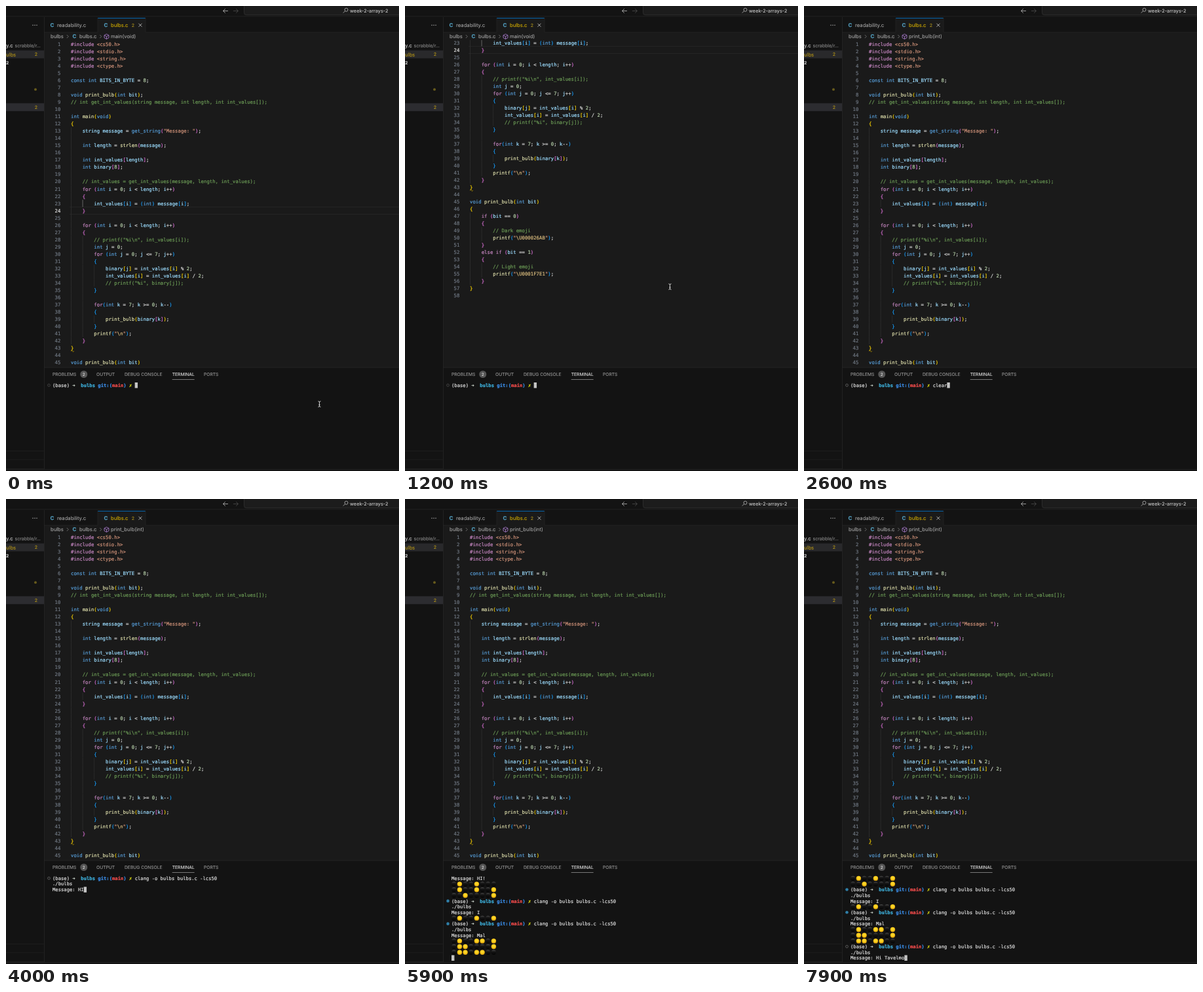
An HTML page for the animation above (8 s loop, 600x709 px).

```html
<!DOCTYPE html>
<html lang="en">
<head>
<meta charset="utf-8">
<title>Binary bulbs</title>
<style>
  html, body { margin: 0; width: 100%; height: 100%; overflow: hidden; background: #131313; }
  svg { display: block; width: 600px; height: 709px; }
  text { text-rendering: geometricPrecision; white-space: pre; fill: currentColor; stroke: currentColor; }
  .ui { font-family: Inter, "Open Sans", sans-serif; stroke-width: 0.12px; }
  .mono { font-family: "DejaVu Sans Mono", "Noto Sans Mono", monospace; stroke-width: 0.2px; }
</style>
</head>
<body>
<svg id="stage" viewBox="0 0 600 709">
  <defs>
    <clipPath id="editorClip"><rect x="58" y="52" width="542" height="498.5"/></clipPath>
    <radialGradient id="lit" cy=".4"><stop offset="0" stop-color="#ffdc32"/><stop offset=".7" stop-color="#fbcb1c"/><stop offset="1" stop-color="#dfa50c"/></radialGradient>
    <linearGradient id="dark" x2="0" y2="1"><stop offset="0" stop-color="#4a4a4a"/><stop offset=".35" stop-color="#161616"/><stop offset="1" stop-color="#040404"/></linearGradient>
  </defs>
</svg>
<script>
const LOOP = 8000, STEP = 100;
const CODE = { x: 99, y: 58.5, pitch: 11.02, size: 7.34, advance: 4.42 };
const TERM = { x: 71, y: 578.2, pitch: 8.68, size: 7.2, advance: 4.334, rows: 15 };

const source = String.raw`#include <cs50.h>
#include <stdio.h>
#include <string.h>
#include <ctype.h>

const int BITS_IN_BYTE = 8;

void print_bulb(int bit);
// int get_int_values(string message, int length, int int_values[]);

int main(void)
{
    string message = get_string("Message: ");

    int length = strlen(message);

    int int_values[length];
    int binary[8];

    // int_values = get_int_values(message, length, int_values);
    for (int i = 0; i < length; i++)
    {
        int_values[i] = (int) message[i];
    }

    for (int i = 0; i < length; i++)
    {
        // printf("%i\n", int_values[i]);
        int j = 0;
        for (int j = 0; j <= 7; j++)
        {
            binary[j] = int_values[i] % 2;
            int_values[i] = int_values[i] / 2;
            // printf("%i", binary[j]);
        }

        for(int k = 7; k >= 0; k--)
        {
            print_bulb(binary[k]);
        }
        printf("\n");
    }
}

void print_bulb(int bit)
{
    if (bit == 0)
    {
        // Dark emoji
        printf("\U000026AB");
    }
    else if (bit == 1)
    {
        // Light emoji
        printf("\U0001F7E1");
    }
}
`.split('\n');

const stage = document.getElementById('stage');

function add(parent, name, attrs, text) {
  const node = document.createElementNS('http://www.w3.org/2000/svg', name);
  for (const key in attrs) node.setAttribute(key, attrs[key]);
  if (text !== undefined) node.textContent = text;
  parent.append(node);
  return node;
}
const rect = (parent, x, y, width, height, fill, more) =>
  add(parent, 'rect', { x, y, width, height, fill, ...more });
const stroke = (parent, d, color, width = 0.8) =>
  add(parent, 'path', { d, stroke: color, 'stroke-width': width, fill: 'none' });
const label = (x, y, text, color, size = 7.7, more) =>
  add(stage, 'text', { class: 'ui', x, y: y + size * 0.36, color, 'font-size': size, ...more }, text);
const mono = (parent, font, x, y, text, color, more) =>
  add(parent, 'text', { class: 'mono', x, y: y + 2.6, color, 'font-size': font.size, ...more }, text);

// Window frame
function drawFrame() {
  const edge = '#292929', bold = { 'font-weight': 700 };
  rect(stage, 0, 0, 600, 709, '#131313');
  rect(stage, 58, 40, 542, 511, '#1a1a1a');
  rect(stage, 140, 18, 73, 23, '#1a1a1a');
  rect(stage, 140, 18, 73, 0.8, '#0078d4');
  rect(stage, 0, 15.5, 600, 0.7, edge);
  rect(stage, 58, 17, 0.7, 689, edge);
  rect(stage, 139.7, 18, 0.6, 22, edge);
  rect(stage, 212.7, 18, 0.6, 22, edge);
  rect(stage, 58, 39.7, 82, 0.6, edge);
  rect(stage, 213, 39.7, 387, 0.6, edge);
  rect(stage, 58, 550.8, 542, 0.7, edge);
  rect(stage, 0, 706, 600, 0.7, edge);
  for (const y of [678, 691.5, 705]) rect(stage, 0, y, 58, 0.6, '#222');

  rect(stage, 363.5, -4, 260, 17.7, '#1c1c1c', { rx: 3.5, stroke: '#363636', 'stroke-width': 0.7 });
  stroke(stage, 'M339 7.5H331.5M334.8 4.2L331.5 7.5L334.8 10.8', '#bbb');
  stroke(stage, 'M347 7.5H354.5M351.2 4.2L354.5 7.5L351.2 10.8', '#4c4c4c');
  stroke(stage, 'M517.6 7.6L514.8 10.6M522 5.8a2.5 2.5 0 1 1-5 0a2.5 2.5 0 1 1 5 0', '#bbb');
  label(525, 7.3, 'week-2-arrays-2', '#c4c4c4', 7.34);

  for (const x of [41, 44, 47]) add(stage, 'circle', { cx: x, cy: 29.2, r: 0.7, fill: '#bbb' });
  label(0, 60.5, 'y.c', '#ccc');
  label(13.5, 60.5, 'scrabble/r...', '#888', 7);
  rect(stage, 0, 67.7, 58, 12, '#29292b');
  label(0, 73.8, 'ulbs', '#b59617');
  label(43.8, 73.6, '2', '#b59617', 7);
  label(0, 87, '2', '#ccc', 6.8, bold);
  add(stage, 'circle', { cx: 45, cy: 127.2, r: 2, fill: '#665a1c' });
  rect(stage, 0, 148.3, 58, 12, '#2c2c30');
  label(43.8, 154.3, '2', '#b59617', 7);

  for (const [x, y] of [[67.5, 29], [149.5, 29], [101.5, 46.5]]) label(x, y, 'C', '#519aba', 8, bold);
  label(78, 29, 'readability.c', '#9d9d9d');
  label(160, 29, 'bulbs.c', '#cca700');
  label(191.8, 29, '2', '#a88f1e', 7);
  stroke(stage, 'M202.5 26.7L207.5 31.7M207.5 26.7L202.5 31.7', '#ccc');

  label(68, 46.5, 'bulbs', '#a0a0a0');
  label(112, 46.5, 'bulbs.c', '#a0a0a0');
  stroke(stage, 'M92.8 44L95.3 46.5L92.8 49M143.3 44L145.8 46.5L143.3 49', '#888', 0.7);
  stroke(stage, 'M153.5 42.8L157 44.6V48.5L153.5 50.4L150 48.5V44.6ZM150 44.6L153.5 46.5L157 44.6M153.5 46.5V50.4', '#b180d7', 0.8);

  const tabs = [[71, 'PROBLEMS'], [138, 'OUTPUT'], [181, 'DEBUG CONSOLE'], [253.7, 'TERMINAL'], [302, 'PORTS']];
  for (const [x, name] of tabs) label(x, 561.5, name, name === 'TERMINAL' ? '#ddd' : '#959595', 6.73);
  rect(stage, 253.7, 569, 34, 0.7, '#a4a4a4');
  add(stage, 'circle', { cx: 118.8, cy: 561.5, r: 5.5, fill: '#565656' });
  label(118.8, 561.5, '2', '#eee', 6, { 'text-anchor': 'middle' });
}

// Syntax colouring
const rules = [
  [/^\/\/.*/, '#6a9955'],
  [/^(#include|\b(for|if|else)\b)/, '#c586c0'],
  [/^(<\w+\.h>|"[^"\\]*"(?!\S*\\)|")/, '#ce9178'],
  [/^\\\w+/, '#d7ba7d'],
  [/^\b(const|int|void|get_string)\b/, '#569cd6'],
  [/^[a-z_]\w*(?=\()/i, '#dcdcaa'],
  [/^\d+/, '#b5cea8'],
  [/^[a-z_]\w*/i, '#9cdcfe'],
  [/^[()[\]{}]/, 'bracket'],
  [/^\s+/, null],
  [/^[^\s\w()[\]{}"]+/, '#d4d4d4'],
];
const bracketColors = ['#ffd700', '#da70d6', '#179fff'];

function drawCode(parent) {
  let depth = 0, indent = 0;
  return source.map((line, row) => {
    const y = CODE.y + row * CODE.pitch;
    if (line) indent = line.search(/\S/);
    for (let col = 0; col < indent; col += 4)
      rect(parent, CODE.x + col * CODE.advance + 0.1, y - 5.5, 0.6, CODE.pitch, '#363636');
    for (let col = 0; col < line.length;) {
      const rest = line.slice(col);
      let [pattern, color] = rules.find(([re]) => re.test(rest));
      const token = rest.match(pattern)[0];
      if (color === 'bracket') {
        const opens = '([{'.includes(token);
        if (!opens) depth--;
        color = bracketColors[depth % 3];
        if (opens) depth++;
      }
      if (color) mono(parent, CODE, CODE.x + col * CODE.advance, y, token, color);
      col += token.length;
    }
    return mono(parent, CODE, 83.3, y, row + 1, '#6e7681', { 'text-anchor': 'end' });
  });
}

drawFrame();
const scope = label(160, 46.5, '', '#a0a0a0');
const editor = add(stage, 'g', { 'clip-path': 'url(#editorClip)' });
const page = add(editor, 'g');
const lineMark = add(page, 'g');
rect(lineMark, 97, -5.6, 503, 0.7, '#2b2b2b');
rect(lineMark, 97, 5, 503, 0.7, '#2b2b2b');
const numbers = drawCode(page);
const activeGuide = rect(page, 116.7, CODE.y + 22 * CODE.pitch - 5.5, 0.7, CODE.pitch, '#777');
stroke(page, 'M99 526.2q1.2 -2 2.4 0t2.4 0', '#cca700', 0.8);
const terminal = add(stage, 'g');
const pointer = stroke(stage, 'M-2 -4.3Q0 -4.3 0 -3Q0 -4.3 2 -4.3M0 -3V3M-2 4.3Q0 4.3 0 3Q0 4.3 2 4.3M-1.2 1H1.2', '#ddd', 0.9);

// Terminal session
const command = 'clang -o bulbs bulbs.c -lcs50';
const greeting = 'Hi Tavelmor';
const cut = (time, length) => [time, greeting.slice(0, length)];
const runs = [
  { prompt: 0, command: 3100, ask: 3500, keys: [[4000, 'HI'], [4100, 'HI!']], output: 4400 },
  { prompt: 4500, command: 4700, ask: 4900, keys: [[5100, 'I']], output: 5300 },
  { prompt: 5400, command: 5500, ask: 5700, keys: [[5800, 'Mal']], output: 5900 },
  { prompt: 6000, command: 6300, ask: 6700, output: Infinity,
    keys: [cut(6900, 1), cut(7000, 2), cut(7100, 3), cut(7200, 4), cut(7300, 6), cut(7400, 7),
           cut(7500, 8), cut(7600, 10), cut(7700, 11), cut(7900, 10)] },
];
const latest = (table, t, initial) => table.reduce((value, [time, next]) => t >= time ? next : value, initial);

function sessionRows(t) {
  const rows = [];
  for (const run of runs) {
    if (t < run.prompt) break;
    const early = t >= 2600 && t < 2800 ? 'clear' : '';
    rows.push({ prompt: true, done: t >= run.output, text: t >= run.command ? command : early });
    if (t >= run.command) rows.push({ text: './bulbs' });
    const typed = latest(run.keys, t, '');
    if (t >= run.ask) rows.push({ text: 'Message: ' + typed });
    if (t >= run.output) for (const char of typed) rows.push({ bits: char.charCodeAt(0) });
  }
  if ('bits' in rows[rows.length - 1]) rows.push({ text: '' });
  return rows.slice(-TERM.rows);
}

const promptParts = [
  [0, '(base)', '#ddd', 400], [7, '➜', '#c9d3c9', 700], [10, 'bulbs', '#3fb4e0', 700],
  [16, 'git:(', '#3b8eea', 700], [21, 'main', '#f14c4c', 700], [25, ')', '#3b8eea', 700], [27, '✗', '#e5e510', 700],
];

function drawTerminal(t) {
  terminal.replaceChildren();
  let cursorX, cursorY;
  sessionRows(t).forEach((row, index) => {
    const y = TERM.y + index * TERM.pitch;
    if ('bits' in row) {
      for (let i = 0; i < 8; i++)
        add(terminal, 'circle', {
          cx: TERM.x + (i + 0.5) * 2 * TERM.advance - 0.6, cy: y + 0.2, r: 3.7,
          fill: row.bits >> (7 - i) & 1 ? 'url(#lit)' : 'url(#dark)',
        });
      return;
    }
    let column = 0;
    if (row.prompt) {
      for (const [col, text, color, weight] of promptParts)
        mono(terminal, TERM, TERM.x + col * TERM.advance, y, text, color, { 'font-weight': weight });
      add(terminal, 'circle', row.done
        ? { cx: 65.5, cy: y, r: 2.3, fill: '#2f7fa8' }
        : { cx: 65.5, cy: y, r: 1.9, fill: 'none', stroke: t < 2600 ? '#555' : '#777', 'stroke-width': 0.7 });
      column = 29;
    }
    const x = TERM.x + column * TERM.advance;
    mono(terminal, TERM, x, y, row.text, '#ddd');
    cursorX = x + row.text.length * TERM.advance;
    cursorY = y - 4.2;
  });
  const hollow = t >= 1300 && t < 2200;
  rect(terminal, cursorX, cursorY, 4.4, 8.5, hollow ? 'none' : '#c4c4c4',
    hollow ? { stroke: '#aaa', 'stroke-width': 0.7 } : {});
}

// Motion tables: time, value
const scroll = [[300, 0], [500, 8], [600, 30], [700, 62], [800, 95], [900, 122.3], [1000, 172], [1100, 222],
  [1200, 245], [1400, 245], [1500, 205], [1700, 55], [1800, 15], [1900, 0]];
const pointerX = [[0, 478.5], [400, 405.5], [900, 405.5], [1200, 404.5], [1800, 404.5], [2200, 278]];
const pointerY = [[0, 607], [400, 427], [1200, 428], [1800, 428], [2200, 584]];

function at(track, t) {
  const next = track.findIndex(([time]) => time > t);
  if (next === 0) return track[0][1];
  if (next < 0) return track[track.length - 1][1];
  const [t0, a] = track[next - 1], [t1, b] = track[next];
  return a + (b - a) * (t - t0) / (t1 - t0);
}

function render(t) {
  page.setAttribute('transform', `translate(0 ${-at(scroll, t)})`);
  const current = t < 1300 ? 24 : 57;
  lineMark.setAttribute('transform', `translate(0 ${CODE.y + (current - 1) * CODE.pitch})`);
  numbers.forEach((node, i) => node.setAttribute('color', i + 1 === current ? '#ddd' : '#6e7681'));
  activeGuide.setAttribute('visibility', current === 24 ? 'visible' : 'hidden');
  scope.textContent = t < 1900 ? 'main(void)' : 'print_bulb(int)';
  pointer.setAttribute('transform', `translate(${at(pointerX, t)} ${at(pointerY, t)})`);
  pointer.setAttribute('visibility', t < 2600 ? 'visible' : 'hidden');
  drawTerminal(t);
}

const start = performance.now();
let shown = -1;
function tick() {
  const t = Math.floor((performance.now() - start) % LOOP / STEP) * STEP;
  if (t !== shown) render(shown = t);
  requestAnimationFrame(tick);
}
tick();
</script>
</body>
</html>
```
